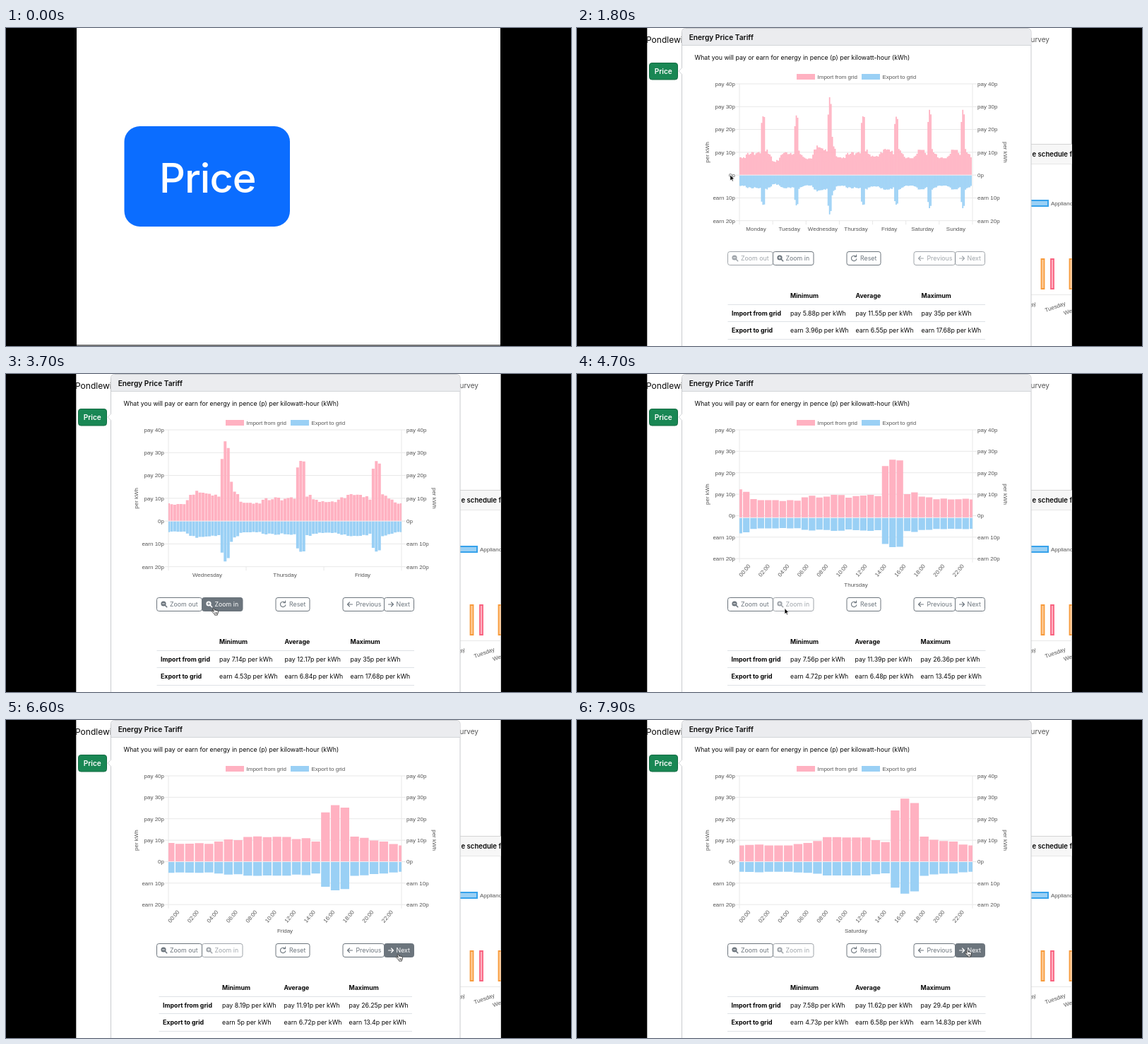
An HTML page that plays this animation: 800 px wide and 450 px high, repeating every 8 s.

```html
<!DOCTYPE html>
<html lang="en">
<head>
<meta charset="utf-8">
<title>Energy price tariff</title>
<style>
  html, body { margin: 0; width: 100%; height: 100%; overflow: hidden; background: #000; }
  svg { display: block; width: 100vw; height: 100vh; }
  text { font: 8.8px Inter, sans-serif; fill: #080808; }
  .bold { font-weight: 700; }
  .title { font-size: 10.2px; font-weight: 600; }
  .chart text, .small { font: 8px "Liberation Sans", Arial, sans-serif; fill: #555; }
  .button text { fill: currentColor; }
  .button rect { fill: #6c757d; stroke: #6c757d; }
  .icon { fill: none; stroke: currentColor; stroke-width: 1.1; stroke-linecap: round; stroke-linejoin: round; }
  .grid { stroke: #e8e8e8; fill: none; }
  .rule { stroke: #dee2e6; }
</style>
</head>
<body>
<svg viewBox="0 0 800 450">
  <defs>
    <clipPath id="stage"><rect x="99.3" width="601.3" height="450"/></clipPath>
    <clipPath id="plot"><rect x="230" y="79" width="330" height="195"/></clipPath>
  </defs>
  <rect width="800" height="450"/>

  <g id="intro">
    <rect x="100" width="600" height="450" fill="#fff"/>
    <path d="M100 449H700" stroke="#777" stroke-width="2"/>
    <rect id="bigButton" x="167.5" y="139" width="234.5" height="142" rx="22"/>
    <text x="285.3" y="233" text-anchor="middle" style="font-size:57.5px;font-weight:500;letter-spacing:-.015em;fill:#fff">Price</text>
  </g>

  <g id="app" clip-path="url(#stage)">
    <rect x="99" width="602" height="450" fill="#fff"/>
    <text x="98" y="21" style="font-size:12px">Pondlewisp</text>
    <text x="669" y="19.5" text-anchor="end" style="font-size:10px;fill:#555">Survey</text>
    <rect x="102.5" y="49.5" width="40" height="23.5" rx="3.5" fill="#198754" stroke="#146c43"/>
    <text x="122.3" y="65.2" text-anchor="middle" style="font-size:10.1px;font-weight:600;fill:#fff">Price</text>

    <rect x="600.5" y="164.5" width="120" height="300" fill="#fff" stroke="#d5d5d5"/>
    <rect x="601" y="165" width="100" height="27" fill="#f7f7f7"/>
    <path class="grid" d="M600 192.5H701M600 377.5H701"/>
    <text class="title" x="644.5" y="182" style="font-size:9.6px">e schedule for today</text>
    <rect x="630" y="244" width="37" height="8" fill="#9ad0f5" stroke="#36a2eb" stroke-width="2"/>
    <text class="small" x="671" y="251">Appliances</text>
    <g stroke-width="1.8">
      <path d="M657.5 327h4v42h-4zM697.5 327h4v42h-4z" fill="#ffcf9f" stroke="#f79b3c"/>
      <path d="M671 327h4v42h-4z" fill="#ffb1c1" stroke="#f9627f"/>
    </g>
    <g text-anchor="middle">
      <text class="small" transform="translate(637 397) rotate(-20)">Monday</text>
      <text class="small" transform="translate(678 397) rotate(-20)">Tuesday</text>
      <text class="small" transform="translate(710 399) rotate(-20)">Wednesday</text>
    </g>

    <rect x="148.5" y=".5" width="494.5" height="470" rx="5" fill="#fff" stroke="#c9cbce"/>
    <path d="M149 24V6a5 5 0 0 1 5-5H637.5a5 5 0 0 1 5 5V24z" fill="#ebecef"/>
    <path d="M149 24.5H643" stroke="#d3d5d8"/>
    <path d="M149 56L144 61L149 66" fill="#fff" stroke="#d3d5d8"/>
    <text class="title" x="158.7" y="16.5">Energy Price Tariff</text>
    <text x="166.5" y="45">What you will pay or earn for energy in pence (p) per kilowatt-hour (kWh)</text>

    <g class="chart">
      <rect x="311" y="65" width="26" height="8" fill="#ffb1c1"/>
      <text x="340.5" y="72">Import from grid</text>
      <rect x="403" y="65" width="26" height="8" fill="#9ad0f5"/>
      <text x="432.5" y="72">Export to grid</text>
    </g>
    <g id="views"></g>
    <g clip-path="url(#plot)">
      <path id="imports" fill="#ffb1c1"/>
      <path id="exports" fill="#9ad0f5"/>
      <path id="baseline" stroke="#f3eef2"/>
    </g>
    <g id="buttons"></g>
  </g>

  <g clip-path="url(#stage)">
    <g id="cursor" stroke-linejoin="round">
      <g id="hand">
        <path d="M-5 5C-5-1 3-2 5 4L9 17C12 12 17 13 18 18C21 14 26 15 27 20C31 17 36 19 37 24V38L31 50V56H9L8 51L-8 33L-15 26C-17 20-12 17-6 22L1 29Z"
          fill="#fff" stroke="#000" stroke-width="4"/>
        <path d="M11 33V47M20 33V47M28 33V47" stroke="#000" stroke-width="3.5"/>
      </g>
      <path id="arrow" d="M0 0V48L11 38L18 54L26 51L19 35H34Z" stroke="#fff" stroke-width="4"/>
    </g>
  </g>
</svg>
<script>
const $ = id => document.getElementById(id);
const lerp = (a, b, k) => a + (b - a) * k;
const clamp = k => Math.min(1, Math.max(0, k));
const mix = (a, b, k) => `rgb(${a.map((v, i) => Math.round(lerp(v, b[i], k)))})`;
const easeOut = k => 1 - (1 - clamp(k)) ** 4;
const range = n => [...Array(n).keys()];
const show = (el, on) => { el.style.display = on ? '' : 'none'; };

const LOOP = 8000, CUT = 1200;
const LEFT = 230, WIDTH = 330, TOP = 79;
const GREY = [108, 117, 125], WHITE = [255, 255, 255];
const DAYS = ['Monday', 'Tuesday', 'Wednesday', 'Thursday', 'Friday', 'Saturday', 'Sunday'];

// Hourly import prices in pence
const tue = [6.3, 6.1, 5.9, 6.8, 6.5, 7.8, 9, 9.4, 10, 10.3, 10.2, 9.4, 9.5, 10, 9.2, 9.5, 22, 26.8, 25.8, 11, 9.4, 9, 8.2, 7.8];
const wed = [7.4, 7.2, 7.5, 7.5, 7.4, 9.2, 11.5, 11.6, 13.3, 12.5, 12.4, 12.1, 12, 11.2, 11.6, 10.7, 27.2, 35, 32, 17.2, 12.9, 11.8, 8.5, 8];
const thu = [8, 8, 7.6, 8, 7.7, 9.3, 10, 9.2, 9.6, 10.4, 10.3, 9.1, 9.8, 10.1, 10.4, 9.8, 23.5, 26.4, 26.1, 10.7, 11.5, 9.6, 9.3, 8.4];
const fri = [8.7, 8.3, 8.4, 8.6, 8.3, 9.4, 10.4, 10, 11.5, 11.8, 11.4, 11.6, 11.5, 10.5, 10.9, 9.4, 23, 26.3, 25.2, 11.7, 11.1, 9.9, 9.4, 8.2];
const sat = [7.6, 7.8, 8, 7.6, 7.6, 7.6, 8.2, 8.7, 9.6, 11.4, 11.4, 11.3, 11.3, 11.3, 10, 9.1, 23.9, 29.4, 27.3, 11.7, 10.2, 9.6, 9.4, 8];
const prices = [thu, tue, wed, thu, fri, sat, sat].flat();
const exportPrice = p => p > 20 ? p * .5 + .2 : p * .452 + 1.3;

const wide = [219, 302, 394.5, 487.5];
const views = [
  { at: CUT, day: 0, days: 7, cols: wide, pay: ['5.88', '11.55', '35'], earn: ['3.96', '6.55', '17.68'] },
  { at: 2400, day: 1, days: 5, cols: wide, pay: ['5.88', '11.79', '35'], earn: ['3.96', '6.66', '17.68'] },
  { at: 3210, day: 2, days: 3, cols: wide, pay: ['7.14', '12.17', '35'], earn: ['4.53', '6.84', '17.68'] },
  { at: 4480, day: 3, days: 1, cols: [218.5, 302, 393.5, 486.5], pay: ['7.56', '11.39', '26.36'], earn: ['4.72', '6.48', '13.45'] },
  { at: 5890, day: 4, days: 1, cols: [222, 306, 393.5, 485.5], pay: ['8.19', '11.91', '26.25'], earn: ['5', '6.72', '13.4'] },
  { at: 7090, day: 5, days: 1, cols: [218.5, 302, 394, 486.5], pay: ['7.58', '11.62', '29.4'], earn: ['4.73', '6.58', '14.83'] },
];

const text = (x, y, s, attrs = '') => `<text x="${x}" y="${y}" ${attrs}>${s}</text>`;
const turned = (x, y, angle, s) =>
  `<text transform="translate(${x} ${y}) rotate(${angle})" text-anchor="middle">${s}</text>`;

function axes(v) {
  const { bottom } = v, middle = (TOP + bottom) / 2;
  let s = turned(186.5, middle, -90, 'per kWh') + turned(604, middle, 90, 'per kWh');
  let grid = `M${LEFT} ${TOP}V${bottom}M${LEFT + WIDTH} ${TOP}V${bottom}`;
  for (let p = 40; p >= -20; p -= 10) {
    const y = TOP + (40 - p) * (bottom - TOP) / 60;
    const label = (p > 0 ? 'pay ' : p < 0 ? 'earn ' : '') + Math.abs(p) + 'p';
    grid += `M225 ${y}H566`;
    s += text(224, y + 2.8, label, 'text-anchor="end"') + text(567, y + 2.8, label);
  }
  for (const i of range(v.days + 1)) grid += `M${LEFT + i * WIDTH / v.days} ${bottom}v5.5`;
  for (const i of range(v.days))
    s += text(LEFT + (i + .5) * WIDTH / v.days, v.days > 1 ? 287 : 301, DAYS[v.day + i], 'text-anchor="middle"');
  if (v.days === 1)
    for (const i of range(12)) s += turned(239.5 + i * 27.5, 279.8, -50, String(i * 2).padStart(2, '0') + ':00');
  return `<g class="chart"><path class="grid" d="${grid}"/>${s}</g>`;
}

function table(v) {
  const row = (y, cells, bold) => cells.map((c, i) => text(v.cols[i], y, c, bold || !i ? 'class="bold"' : '')).join('');
  const start = v.cols[0] - 5.5;
  return row(382, ['', 'Minimum', 'Average', 'Maximum'], true)
    + row(406.5, ['Import from grid', ...v.pay.map(p => `pay ${p}p per kWh`)])
    + row(431, ['Export to grid', ...v.earn.map(p => `earn ${p}p per kWh`)])
    + [391.5, 415.5, 440.5].map(y => `<path class="rule" d="M${start} ${y}H${791.5 - start}"/>`).join('');
}

for (const v of views) {
  v.bottom = v.days > 1 ? 272.7 : 261.2;
  v.step = WIDTH / v.days / 24;
  v.origin = LEFT - v.day * 24 * v.step;
  v.zero = TOP + (v.bottom - TOP) * 2 / 3;
  v.el = document.createElementNS('http://www.w3.org/2000/svg', 'g');
  v.el.innerHTML = axes(v) + table(v);
  $('views').append(v.el);
}

const lens = (x, sign) => `<circle cx="${x}" cy="325" r="3.6" fill="currentColor"/>
  <path class="icon" d="M${x + 2.5} 327.5l2.2 2.2" style="stroke-width:1.6"/>
  <path class="sign" d="M${x - 1.8} 325h3.6${sign}"/>`;
const line = d => `<path class="icon" d="${d}"/>`;
// hover: [start, end] of the pointer's stay
const buttons = [
  { x: 213.5, w: 64, label: 'Zoom out', tx: 232, icon: lens(223, ''), off: i => i === 0 },
  { x: 277.5, w: 57.5, label: 'Zoom in', tx: 295.5, icon: lens(287, 'm-1.8-1.8v3.6'), off: i => i > 2, hover: [2080, 4480] },
  { x: 382, w: 48, label: 'Reset', tx: 401, icon: line('M395 323.5a3.7 3.7 0 1 0 .8 3.3M395.6 321v2.8h-2.8'), off: () => false },
  { x: 477, w: 58.5, label: 'Previous', tx: 495.5, icon: line('M490.5 326h-7m3-3l-3 3l3 3'), off: i => i === 0, hover: [5335, 5560] },
  { x: 535.5, w: 42, label: 'Next', tx: 552.5, icon: line('M541.5 326h7m-3-3l3 3l-3 3'), off: i => i === 0, hover: [5500, LOOP] },
];
$('buttons').innerHTML = buttons.map(b => `<g class="button">
  <rect x="${b.x}" y="316.5" width="${b.w}" height="19" rx="3"/>${b.icon}${text(b.tx, 329.2, b.label)}</g>`).join('');
buttons.forEach((b, i) => { b.el = $('buttons').children[i]; });

function drawButtons(t, current) {
  for (const b of buttons) {
    const off = b.off(current);
    const [from, to] = b.hover || [LOOP, LOOP];
    const k = off ? 0 : clamp((t - from) / 150) * (1 - clamp((t - to) / 150));
    b.el.style.opacity = off ? .65 : 1;
    b.el.style.color = mix(GREY, WHITE, k);
    b.el.querySelector('rect').style.fillOpacity = k;
    const sign = b.el.querySelector('.sign');
    if (sign) sign.style.stroke = mix(WHITE, GREY, k);
  }
}

function drawBars(t, current) {
  const to = views[current], from = views[Math.max(0, current - 1)];
  const k = easeOut((t - to.at) / 1000);
  const grow = current ? 1 : k;
  const [step, origin, zero] = ['step', 'origin', 'zero'].map(p => lerp(from[p], to[p], k));
  const scale = (zero - TOP) / 40 * grow, w = step * .9;
  let up = '', down = '';
  prices.forEach((p, h) => {
    const x = origin + h * step - w / 2;
    if (x + w < LEFT || x > LEFT + WIDTH) return;
    const bar = height => `M${x.toFixed(2)} ${zero.toFixed(2)}h${w.toFixed(2)}v${height.toFixed(2)}h${-w.toFixed(2)}z`;
    up += bar(-p * scale);
    down += bar(exportPrice(p) * scale);
  });
  $('imports').setAttribute('d', up);
  $('exports').setAttribute('d', down);
  $('baseline').setAttribute('d', `M${LEFT} ${zero}h${WIDTH}`);
}

// Pointer stops: time, x, y
const introPath = [[400, 375, 440], [950, 285, 185]];
const appPath = [[1400, 122.6, 56.6], [2150, 294, 331.5], [4950, 294, 331.5],
  [5400, 517, 331.5], [5650, 555, 331.5], [6700, 555, 331.5], [7200, 552, 325.5]];

function pointAt(path, t) {
  const i = path.findIndex(p => p[0] > t);
  if (i < 1) return (i ? path.at(-1) : path[0]).slice(1);
  const [a, b] = [path[i - 1], path[i]];
  const u = (t - a[0]) / (b[0] - a[0]), k = u * u * (3 - 2 * u);
  return [lerp(a[1], b[1], k), lerp(a[2], b[2], k)];
}

function drawCursor(t, current) {
  const intro = t < CUT;
  const [x, y] = pointAt(intro ? introPath : appPath, t);
  const over = intro ? y < 281
    : (x < 143 && y < 73) || (y > 316 && buttons.some(b => x >= b.x && x < b.x + b.w && !b.off(current)));
  show($('cursor'), t >= 400);
  show($('hand'), over);
  show($('arrow'), !over);
  $('cursor').setAttribute('transform', `translate(${x} ${y}) scale(${intro ? 1 : 1 / 5.8})`);
}

function frame(now) {
  const t = Math.floor(now % LOOP / 100) * 100;
  const current = Math.max(0, views.filter(v => v.at <= t).length - 1);
  show($('intro'), t < CUT);
  show($('app'), t >= CUT);
  $('bigButton').style.fill = mix([11, 109, 255], [11, 94, 215], clamp((t - 720) / 150));
  views.forEach((v, i) => show(v.el, i === current));
  drawBars(t, current);
  drawButtons(t, current);
  drawCursor(t, current);
}

const start = performance.now();
const tick = () => { frame(performance.now() - start); requestAnimationFrame(tick); };
tick();
</script>
</body>
</html>
```
